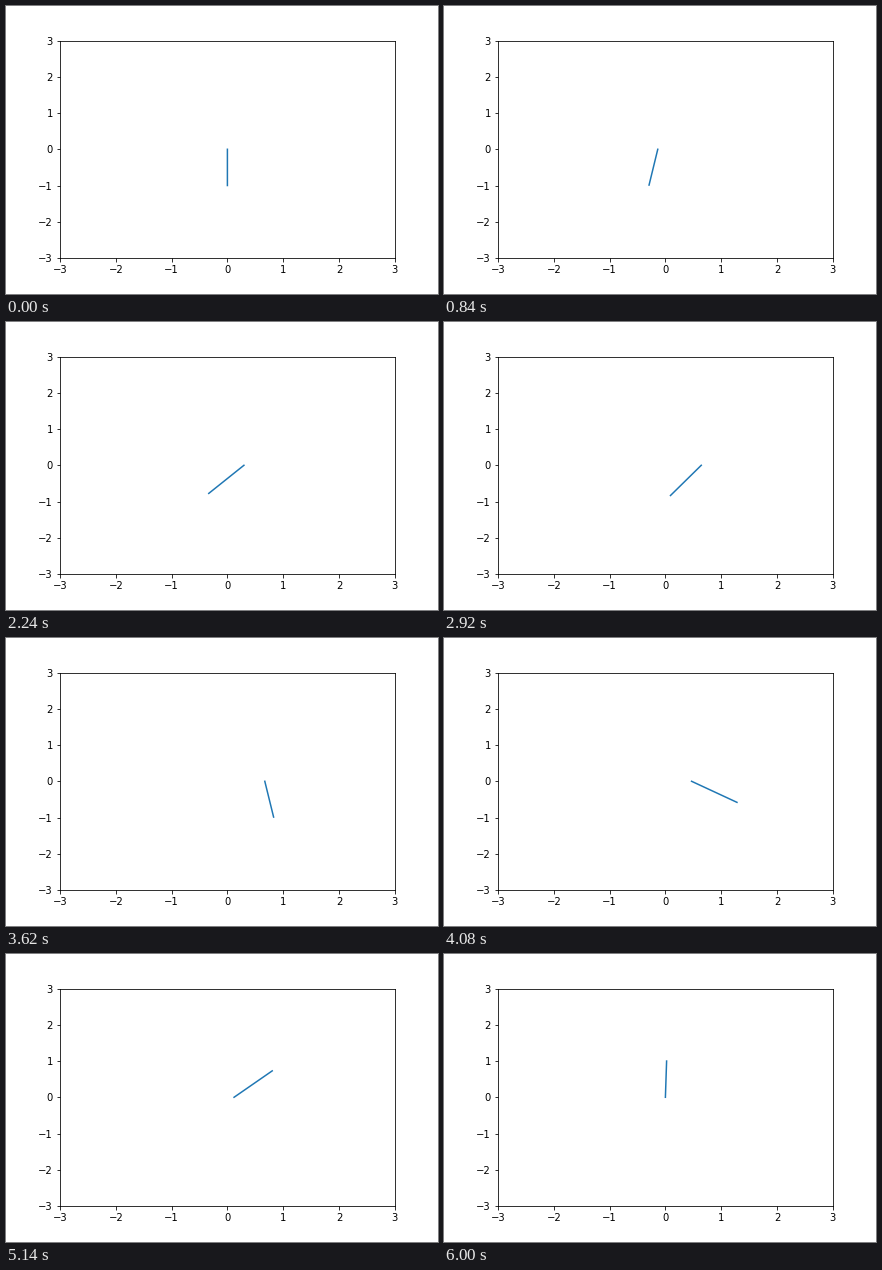
These frames come from a looping animation (432 px wide and 288 px high, 6.02 s). A matplotlib script:

```python
import numpy as np
import matplotlib.pyplot as plt
from matplotlib.animation import FuncAnimation

STEPS = 301
DT = 0.02
GAP = 0.75  # seconds between key poses

# Key poses of the swing-up: cart position, pole angle from straight down
CART = [0, -0.133, -0.044, 0.302, 0.668, 0.628, 0.258, 0.106, 0]
ANGLE = [0, -0.131, -0.413, -0.684, -0.535, 0.365, 1.667, 2.485, 3.12]


def spline(t, keys):
    """Natural cubic spline through evenly spaced key values."""
    y = np.array(keys, float)
    n = len(y) - 2
    system = 4 * np.eye(n) + np.eye(n, k=1) + np.eye(n, k=-1)
    bend = np.zeros(len(y))
    bend[1:-1] = np.linalg.solve(system, np.diff(y, 2))
    i = np.minimum((t / GAP).astype(int), n)
    s = t / GAP - i
    r = 1 - s
    return (r * y[i] + s * y[i + 1]
            + (r ** 3 - r) * bend[i] + (s ** 3 - s) * bend[i + 1])


times = np.arange(STEPS) * DT
cart = spline(times, CART)
angle = spline(times, ANGLE)

fig = plt.figure(figsize=(6, 4), dpi=72, facecolor="white")
fig.subplots_adjust(left=0.125, right=0.9, bottom=0.125, top=0.88)
ax = fig.add_subplot(xlim=(-3, 3), ylim=(-3, 3))
pole, = ax.plot([], [], snap=False)


def update(n):
    x, a = cart[n], angle[n]
    pole.set_data([x, x + np.sin(a)], [0, -np.cos(a)])
    return pole,


anim = FuncAnimation(fig, update, frames=STEPS, interval=1000 * DT,
                     repeat=True, repeat_delay=0)
plt.show()
```
